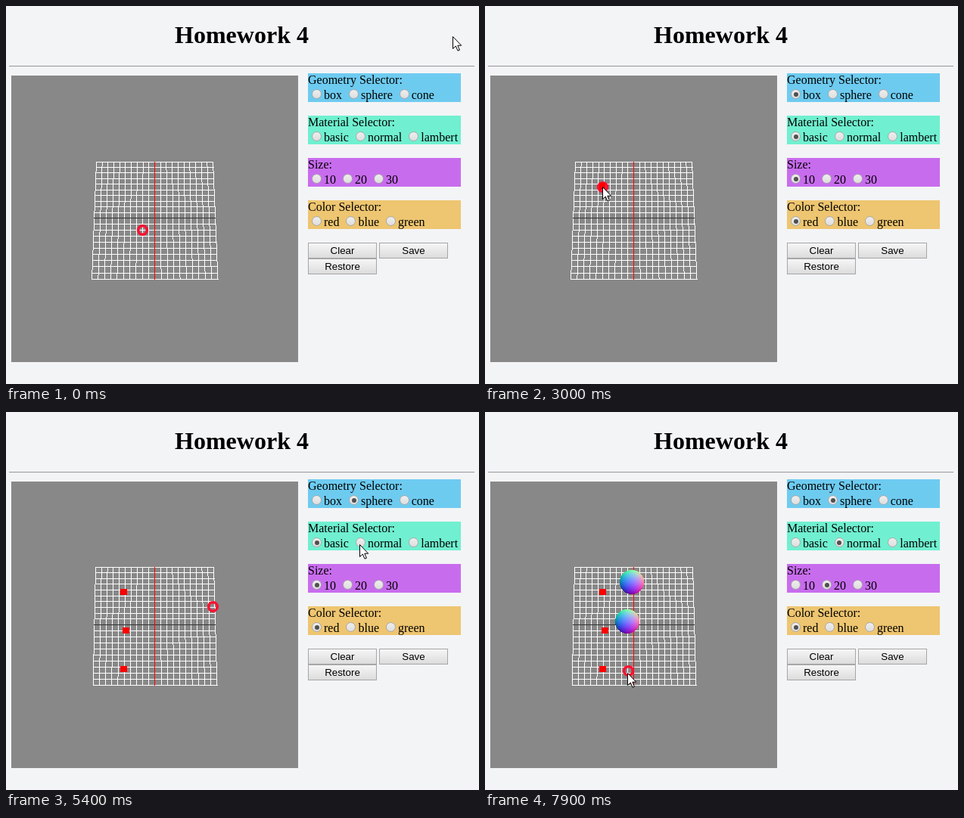
An HTML page with a canvas for the animation above (8 s loop, 625x500 px).

```html
<!DOCTYPE html>
<html lang="en">
<head>
<meta charset="utf-8">
<title>Homework 4</title>
<style>
  html, body { margin: 0; width: 100%; height: 100%; overflow: hidden; }
  body { position: relative; background: #f3f4f6; color: #000; font: 16px "Liberation Serif", serif; }
  h1 { position: absolute; left: 4px; top: 20px; width: 615px; margin: 0; font-size: 32px; text-align: center; }
  .rule { position: absolute; left: 4px; top: 79px; width: 615px; height: 1px; background: #9a9a9a; border-bottom: 1px solid #eee; }
  canvas { position: absolute; left: 7px; top: 92px; }
  .panel { position: absolute; left: 399px; width: 202px; height: 38px; white-space: nowrap; }
  .radio {
    display: inline-block; box-sizing: border-box; position: relative;
    width: 13px; height: 13px; margin: 3px 3px 0 5px;
    border: 1px solid #a9a9a9; border-radius: 50%;
    background: linear-gradient(#eee, #dedede);
  }
  .radio.on::after {
    content: ""; position: absolute; left: 2.5px; top: 2.5px;
    width: 6px; height: 6px; border-radius: 50%; background: #505050;
  }
  .button {
    position: absolute; box-sizing: border-box; width: 91px; height: 21px;
    border: 1px solid #a6a6a6; background: linear-gradient(#f6f6f6, #dcdcdc);
    font: 13.333px/19px "Liberation Sans", sans-serif; text-align: center;
  }
  #cursor { position: absolute; left: 0; top: 0; }
</style>
</head>
<body>
<h1>Homework 4</h1>
<div class="rule"></div>
<canvas id="scene" width="379" height="379"></canvas>
<div id="panels"></div>
<div class="button" style="left:399px;top:313px">Clear</div>
<div class="button" style="left:493px;top:313px">Save</div>
<div class="button" style="left:399px;top:334px">Restore</div>
<svg id="cursor" width="14" height="21">
  <path d="M.5 .5V16.5L4.3 13L7 19.2L9.4 18.2L6.8 12.2H11.7Z" fill="#fff" stroke="#000"/>
</svg>
<script>
// All times are counted in steps.
const STEP = 100, STEPS = 80;
const cursor = document.getElementById('cursor');
const ctx = document.getElementById('scene').getContext('2d');
ctx.translate(-7, -92); // draw in page coordinates

// picks: when each option is chosen, in order
const panels = [
  { title: 'Geometry Selector:', color: '#6ecbf0', options: ['box', 'sphere', 'cone'], picks: [6, 50] },
  { title: 'Material Selector:', color: '#70f0d0', options: ['basic', 'normal', 'lambert'], picks: [10, 55] },
  { title: 'Size:', color: '#c86cee', options: ['10', '20', '30'], picks: [16, 60] },
  { title: 'Color Selector:', color: '#eec570', options: ['red', 'blue', 'green'], picks: [23] }
];

panels.forEach((panel, i) => {
  const el = document.createElement('div');
  el.className = 'panel';
  el.style.cssText = `top:${89 + 56 * i}px;background:${panel.color}`;
  el.innerHTML = panel.title + '<br>' +
    panel.options.map(name => `<span class="radio"></span>${name}`).join(' ');
  document.getElementById('panels').append(el);
  panel.radios = [...el.querySelectorAll('.radio')];
});

// pointer path: [step, x, y]
const path = [
  [0, 590, 40], [5, 420, 110], [7, 410, 120], [9, 411, 168], [12, 414, 191],
  [15, 411, 228], [18, 412, 253], [22, 412, 279], [24, 398, 281], [26, 170, 248],
  [28, 155, 238], [30, 155, 239], [33, 158, 288], [35, 158, 289], [38, 155, 340],
  [39, 155, 339], [41, 273, 257], [44, 526, 118], [45, 490, 116], [51, 459, 121],
  [52, 459, 121], [54, 467, 175], [60, 450, 225], [63, 432, 230], [65, 285, 240],
  [67, 194, 224], [68, 194, 224], [73, 188, 277], [78, 189, 342], [79, 188, 345]
];

function pointerAt(t) {
  let i = 0;
  while (i < path.length - 2 && path[i + 1][0] <= t) i++;
  const [t0, x0, y0] = path[i], [t1, x1, y1] = path[i + 1];
  const k = Math.min(1, (t - t0) / (t1 - t0));
  return [Math.round(x0 + (x1 - x0) * k), Math.round(y0 + (y1 - y0) * k)];
}

// The marker trails the pointer by one step and stays put off the grid.
function markerAt(t) {
  for (let s = t - 1; s > 0; s--) {
    const [x, y] = pointerAt(s);
    if (x > 115 && x < 279 && y > 205 && y < 363) return [x, y];
  }
  return [180, 296];
}

function drawGrid(tilted) {
  const top = tilted ? 205 : 206, bottom = 361;
  const [tl, tr, bl, br] = tilted ? [118, 274, 114.6, 278.4] : [119, 273, 113, 279.5];
  const w0 = 1 / (tr - tl), w1 = 1 / (br - bl);
  const rect = (x, y, w) => ctx.fillRect(Math.round(x), y, Math.round(w), 1);

  ctx.fillStyle = '#fff';
  for (let i = 0; i <= 20; i++) {
    const x0 = tl + (tr - tl) * i / 20, x1 = bl + (br - bl) * i / 20;
    if (i === 10) continue;
    for (let y = top; y <= bottom; y++) {
      rect(x0 + (x1 - x0) * (y - top) / (bottom - top), y, 1);
    }
  }
  for (let i = 0; i <= 20; i++) {
    const a = w0 * (1 - i / 20), b = w1 * i / 20;
    const y = Math.round((top * a + bottom * b) / (a + b));
    const k = (y - top) / (bottom - top);
    const left = tl + (bl - tl) * k, right = tr + (br - tr) * k;
    ctx.fillStyle = i === 10 ? '#333' : '#fff';
    rect(left, y, right - left + 1);
  }
  ctx.fillStyle = '#f00';
  ctx.fillRect(196, top, 1, bottom - top + 1);
}

function drawMarker([x, y]) {
  ctx.strokeStyle = '#fc1030';
  ctx.lineWidth = 3.6;
  ctx.beginPath();
  ctx.arc(x + .5, y + .5, 5.8, 0, 2 * Math.PI);
  ctx.stroke();
}

function drawBox(x, y, tilted) {
  ctx.fillStyle = '#f00';
  if (tilted) ctx.fillRect(x - 4, y - 4, 9, 8);
  else ctx.fillRect(x - 4, y - 4, 8, 9);
}

// Each pixel takes its colour from the surface normal.
function drawSphere(cx, cy, r = 16) {
  for (let y = -r; y < r; y++) {
    for (let x = -r; x < r; x++) {
      const nx = (x + .5) / r, ny = -(y + .5) / r, zz = 1 - nx * nx - ny * ny;
      if (zz < 0) continue;
      const rgb = [nx, ny, Math.sqrt(zz)].map(n => Math.round(127.5 * (n + 1)));
      ctx.fillStyle = `rgb(${rgb})`;
      ctx.fillRect(cx + x, cy + y, 1, 1);
    }
  }
}

function render(t) {
  const tilted = t >= 40;
  ctx.fillStyle = '#888';
  ctx.fillRect(7, 92, 379, 379);
  drawGrid(tilted);
  drawMarker(markerAt(t));
  if (t >= 30) drawBox(155, 238, tilted);
  if (t >= 35) drawBox(158, 289, tilted);
  if (t >= 39) drawBox(155, 340, tilted);
  if (t >= 69) drawSphere(194, 225);
  if (t >= 74) drawSphere(188, 277);

  for (const { picks, radios } of panels) {
    const chosen = picks.filter(at => t >= at).length - 1;
    radios.forEach((el, i) => el.classList.toggle('on', i === chosen));
  }
  const [x, y] = pointerAt(t);
  cursor.style.transform = `translate(${x}px, ${y}px)`;
}

const start = performance.now();
let shown = -1;
function tick() {
  const elapsed = Math.max(0, performance.now() - start);
  const t = Math.floor(elapsed / STEP) % STEPS;
  if (t !== shown) render(shown = t);
  requestAnimationFrame(tick);
}
tick();
</script>
</body>
</html>
```
